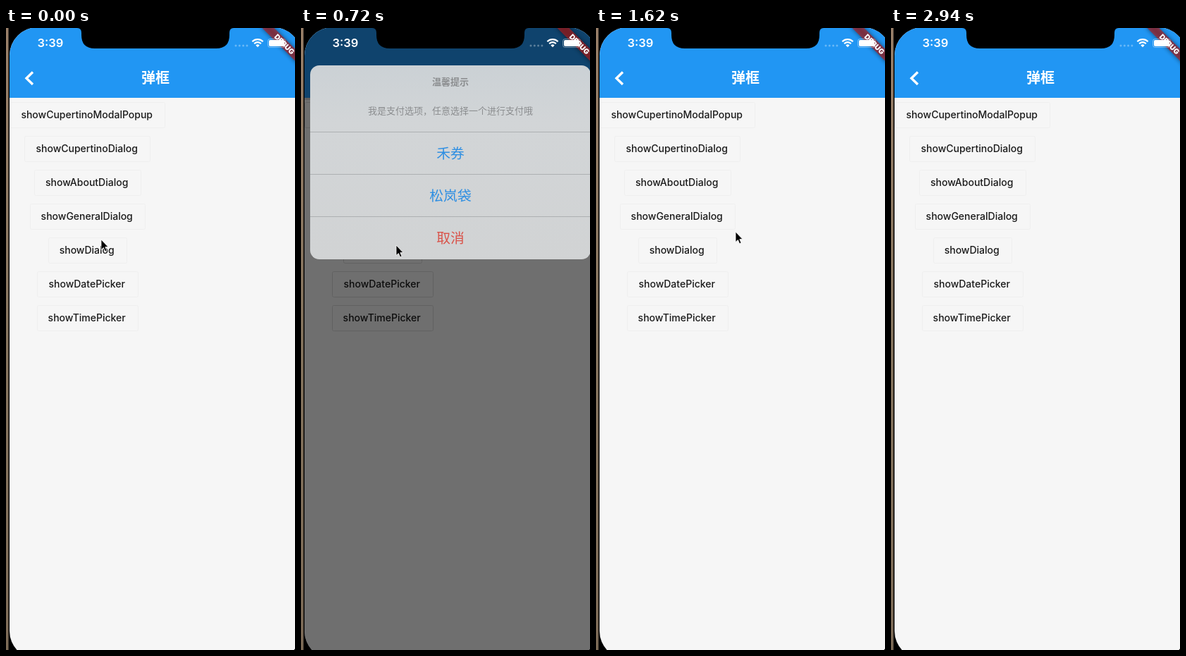
An HTML page for the animation above (3000 ms loop, 410 by 882 pixels).

```html
<!DOCTYPE html>
<html lang="zh">
<head>
<meta charset="utf-8">
<style>
html, body { margin: 0; width: 100%; height: 100%; overflow: hidden; background: #000 }
svg { display: block; width: 410px; height: 882px; font-family: Inter, "Noto Sans CJK SC", "Noto Sans CJK", sans-serif }
.mid { text-anchor: middle }
.buttons { font-size: 14px; font-weight: 500; fill: #1a1a1a }
.line { stroke: #adb0b2; stroke-width: 1 }
</style>
</head>
<body>
<svg viewBox="0 0 410 882">
  <defs>
    <clipPath id="screen"><rect x="5" y="-1" width="414" height="896" rx="40"/></clipPath>
    <clipPath id="pressed"><rect x="59" y="297" width="112" height="36" rx="2"/></clipPath>
    <linearGradient id="wall" x2="0" y2="1">
      <stop stop-color="#9a8069"/><stop offset=".5" stop-color="#85745e"/><stop offset="1" stop-color="#7d6b57"/>
    </linearGradient>
    <linearGradient id="glass" x2="0" y2="1">
      <stop stop-color="#cbd1d5"/><stop offset=".3" stop-color="#d2d5d7"/><stop offset="1" stop-color="#d1d3d4"/>
    </linearGradient>
    <filter id="blur" x="-50%" y="-100%" width="200%" height="300%"><feGaussianBlur stdDeviation="3"/></filter>
  </defs>
  <rect width="410" height="882"/>
  <rect width="3.5" height="882" fill="url(#wall)"/>

  <g clip-path="url(#screen)">
    <rect x="5" width="414" height="882" fill="#f6f6f6"/>
    <rect id="barShadow" x="5" y="99" width="414" height="3" opacity="0"/>
    <rect x="5" y="-1" width="414" height="100" fill="#2196f3"/>
    <path d="M38 62.5L29 71.3L38 80" fill="none" stroke="#fff" stroke-width="3.4"/>
    <text class="mid" x="212" y="78.3" font-size="20" font-weight="600" fill="#fff">弹框</text>
    <g id="boxes" fill="none"></g>
    <g clip-path="url(#pressed)"><circle id="ripple" cx="135" cy="312"/></g>
    <g id="labels" class="buttons mid"></g>
    <rect id="barrier" x="5" y="-1" width="414" height="896"/>

    <g id="panel" class="mid">
      <rect x="13" y="53" width="398" height="275" rx="13" fill="url(#glass)"/>
      <path class="line" d="M13 147.5H411M13 207.5H411M13 267.5H411"/>
      <g font-size="13" fill="#8b8d8f">
        <text x="212" y="81" font-weight="700">温馨提示</text>
        <text x="212" y="121.5">我是支付选项，任意选择一个进行支付哦</text>
      </g>
      <g font-size="19.8" fill="#2f8fe2">
        <text x="212" y="184.5">禾券</text>
        <text x="212" y="245">松岚袋</text>
        <text x="212" y="305" fill="#d9534a">取消</text>
      </g>
    </g>

    <g transform="translate(419 -1) rotate(45)">
      <rect x="-40" y="28" width="80" height="12" opacity=".5" filter="url(#blur)"/>
      <rect x="-40" y="28" width="80" height="12" fill="#b71c1c" fill-opacity=".63"/>
    </g>
    <g fill="#fff">
      <text x="44.5" y="27.3" font-size="16.5" font-weight="600">3:39</text>
      <path d="M326 25h.01M331.3 25h.01M336.6 25h.01M341.9 25h.01" stroke="#fff" stroke-opacity=".32" stroke-width="3" stroke-linecap="round"/>
      <path d="M357 27.3L354.3 24.4A4 4 0 0 1 359.7 24.4Z"/>
      <path d="M352.2 22.2A6.8 6.8 0 0 1 361.8 22.2M349.4 19.3A10.8 10.8 0 0 1 364.6 19.3" fill="none" stroke="#fff" stroke-width="2.2"/>
      <rect x="371.5" y="15.5" width="25" height="12" rx="3.2" fill="none" stroke="#fff" stroke-opacity=".4"/>
      <rect x="373" y="17" width="22" height="9" rx="2"/>
      <text class="mid" transform="translate(419 -1) rotate(45)" y="37.6" font-size="10.2" font-weight="900">DEBUG</text>
    </g>
  </g>
  <path d="M101 0Q107 0 107 7V10Q107 29 126 29H298Q317 29 317 10V7Q317 0 323 0Z"/>
  <path id="cursor" d="M0 0V14.5L3.4 11.5L5.6 16.8L8 15.8L5.8 10.6H10Z" stroke="#fff" stroke-width=".8"/>
</svg>
<script>
const $ = id => document.getElementById(id);
const clamp = v => Math.min(1, Math.max(0, v));
const ramp = (t, from, to) => clamp((t - from) / (to - from));
const smooth = p => p * p * (3 - 2 * p);
const mix = (a, b, p) => a + (b - a) * p;

const buttons = [
  ['showCupertinoModalPopup', 220], ['showCupertinoDialog', 178], ['showAboutDialog', 151],
  ['showGeneralDialog', 163], ['showDialog', 111], ['showDatePicker', 143], ['showTimePicker', 143]
];
buttons.forEach(([name, w], i) => {
  const y = 48 * i;
  $('boxes').innerHTML += `<rect x="${Math.round(115 - w / 2) + .5}" y="${y + 105.5}" width="${w}" height="36" rx="2"/>`;
  $('labels').innerHTML += `<text x="114.7" y="${y + 128}">${name}</text>`;
});

// Cursor path: time, x, y
const path = [
  [0, 135, 300], [240, 135, 308], [900, 135, 308], [1380, 198, 289],
  [1740, 198, 289], [2220, 425, 390], [3000, 425, 390]
];
function cursorAt(t) {
  const i = path.findIndex(p => p[0] > t);
  const [a, b] = [path[i - 1], path[i]];
  const p = smooth(ramp(t, a[0], b[0]));
  return [mix(a[1], b[1], p), mix(a[2], b[2], p)];
}

function draw(now) {
  const t = Math.floor(now % 3000 / 60) * 60; // the picture advances in 60 ms steps
  const open = ramp(t, 425, 575), close = ramp(t, 1500, 1620);
  const show = (1 - (1 - open) ** 1.6) * (1 - close);
  const grey = Math.round(mix(239, 217, clamp(show * 2)));

  $('barrier').setAttribute('opacity', .55 * clamp(show * 1.18));
  $('panel').setAttribute('opacity', show < 1 ? show * .92 : 1);
  $('barShadow').setAttribute('opacity', .15 * show);
  $('boxes').setAttribute('stroke', `rgb(${grey},${grey},${grey})`);
  $('ripple').setAttribute('r', mix(10, 53, ramp(t, 360, 480)));
  $('ripple').setAttribute('opacity', .13 * ramp(t, 340, 420) * (1 - ramp(t, 520, 700)));
  $('cursor').setAttribute('transform', `translate(${cursorAt(t)})`);
}

const start = performance.now();
(function frame() {
  draw(performance.now() - start);
  requestAnimationFrame(frame);
})();
</script>
</body>
</html>
```
